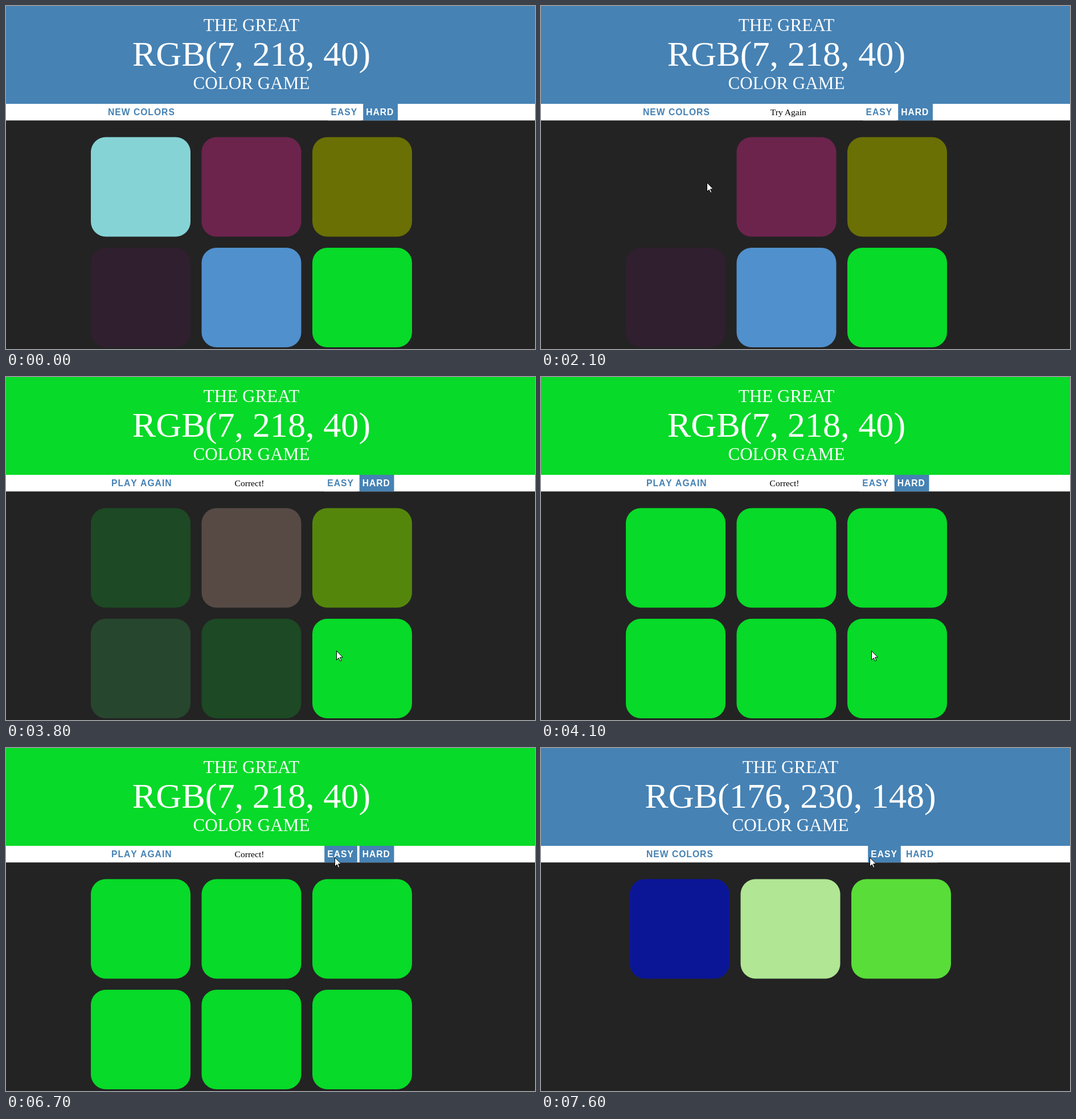
Animation of 929x603 px, one loop 8000 ms. Source, as an HTML page:

```html
<!DOCTYPE html>
<html lang="en">
<head>
<meta charset="utf-8">
<title>Color Game</title>
<style>
  html, body { margin: 0; width: 100%; height: 100%; overflow: hidden; background: #232323; }
  svg { display: block; width: 929px; height: 603px; }
  .head { font-family: "Liberation Serif", "Times New Roman", serif; fill: #fff; text-anchor: middle; }
  .btn { font: bold 15.7px "Liberation Sans", Arial, sans-serif; letter-spacing: .98px; font-kerning: none; }
  .msg { font: 15.56px "Liberation Serif", "Times New Roman", serif; }
</style>
</head>
<body>
<svg id="stage" viewBox="0 0 929 603" xmlns="http://www.w3.org/2000/svg"></svg>
<script>
const LOOP = 8000;
const BG = [35, 35, 35], BLUE = [70, 130, 180], WHITE = [255, 255, 255], GREEN = [7, 218, 40];
const HARD_SET = [[134, 211, 213], [108, 36, 77], [106, 112, 4], [48, 31, 47], [80, 144, 205], GREEN];
const EASY_SET = [[11, 22, 151], [176, 230, 148], [89, 221, 56]];

// Pointer way points: time, x, y
const PATH = [
  [600, 127, 97], [900, 212, 236], [1800, 212, 236], [2600, 462, 469],
  [3100, 462, 469], [3400, 580, 481], [4800, 580, 481], [5100, 504, 377],
  [5400, 504, 377], [5700, 460, 312], [5900, 481, 270], [6000, 481, 270],
  [6600, 577, 192]
];

const stage = document.getElementById('stage');

function add(tag, attrs, text) {
  const el = document.createElementNS(stage.namespaceURI, tag);
  set(el, attrs);
  if (text) el.textContent = text;
  return stage.appendChild(el);
}

function set(el, attrs) {
  for (const k in attrs) el.setAttribute(k, attrs[k]);
}

const rgb = c => `rgb(${c.map(Math.round).join(',')})`;
const mix = (a, b, k) => a.map((v, i) => v + (b[i] - v) * k);

// Progress of a colour fade, one level per 100 ms
function fade(t, start, levels) {
  if (t < start) return 0;
  const i = Math.floor((t - start) / 100);
  return i < levels.length ? levels[i] : 1;
}

add('rect', { width: 929, height: 603, fill: rgb(BG) });
const banner = add('rect', { width: 929, height: 172 });
const title = [['THE GREAT', 31.12, 43.8], ['', 62.24, 105.2], ['COLOR GAME', 31.12, 146.2]]
  .map(([s, size, y]) => add('text', { class: 'head', 'font-size': size, y }, s));
add('rect', { y: 172, width: 929, height: 29.2, fill: '#fff' });

const reset = add('text', { class: 'btn', y: 191.8, fill: rgb(BLUE) });
const message = add('text', { class: 'msg', y: 192 });

function makeMode(label, width) {
  const box = add('rect', { y: 172, width, height: 29.2 });
  const text = add('text', { class: 'btn', y: 191.8 }, label);
  return (x, on) => {
    set(box, { x, fill: rgb(mix(WHITE, BLUE, on)) });
    set(text, { x: x + 5, fill: rgb(mix(BLUE, WHITE, on)) });
  };
}
const easy = makeMode('EASY', 57.6), hard = makeMode('HARD', 60.8);

const tiles = HARD_SET.map((c, i) => add('rect', {
  y: i < 3 ? 230.5 : 425, width: 175, height: 175, rx: 26.25
}));

const pointer = add('path', {
  d: 'M.5 .5V16.4L4.2 12.9L6.7 18.5L9 17.5L6.5 11.9H11.5Z',
  fill: '#fff', stroke: '#000', 'stroke-width': 1
});

function pointerAt(t) {
  const i = PATH.findIndex(p => p[0] > t);
  if (i < 0) return PATH[PATH.length - 1].slice(1);
  const [t0, x0, y0] = PATH[i - 1], [t1, x1, y1] = PATH[i];
  const u = (t - t0) / (t1 - t0), k = u * u * (3 - 2 * u);
  return [x0 + (x1 - x0) * k, y0 + (y1 - y0) * k];
}

function tileColor(i, t) {
  if (t >= 7200) return mix(GREEN, EASY_SET[i], fade(t, 7200, [.2, .2, .7, .95]));
  let c = HARD_SET[i];
  if (i === 0) c = mix(c, BG, fade(t, 1400, [.12, .7]));
  if (i === 4) c = mix(c, BG, fade(t, 3000, [.23, .75]));
  return mix(c, GREEN, fade(t, 3800, [.21, .21, .78]));
}

function draw(time) {
  const t = Math.floor(time % LOOP / 100) * 100;
  const won = t >= 3800 && t < 7200, isEasy = t >= 7200;
  const shift = isEasy ? 7 : 0;

  set(banner, { fill: rgb(won ? GREEN : BLUE) });
  title[1].textContent = isEasy ? 'RGB(176, 230, 148)' : 'RGB(7, 218, 40)';
  title.forEach(el => set(el, { x: 431 + shift }));

  reset.textContent = won ? 'PLAY AGAIN' : 'NEW COLORS';
  set(reset, { x: won || isEasy ? 185 : 179 });
  message.textContent = won ? 'Correct!' : t >= 1400 && !isEasy ? 'Try Again' : '';
  set(message, { x: won ? 401.6 : 402.8 });

  const left = isEasy ? 574.2 : won ? 559.2 : 565.5;
  easy(left, isEasy ? 1 : fade(t, 6500, [.15, .75]));
  hard(isEasy ? 636 : won ? 620.7 : 627.2, isEasy ? 0 : 1);

  tiles.forEach((el, i) => {
    const shown = !isEasy || i < 3;
    set(el, { x: 149 + shift + 194.5 * (i % 3), display: shown ? 'inline' : 'none' });
    if (shown) set(el, { fill: rgb(tileColor(i, t)) });
  });

  const visible = t >= PATH[0][0];
  set(pointer, { display: visible ? 'inline' : 'none' });
  if (visible) set(pointer, { transform: `translate(${pointerAt(t).map(Math.round)})` });
}

const begin = performance.now();
function tick() {
  draw(performance.now() - begin);
  requestAnimationFrame(tick);
}
tick();
</script>
</body>
</html>
```
